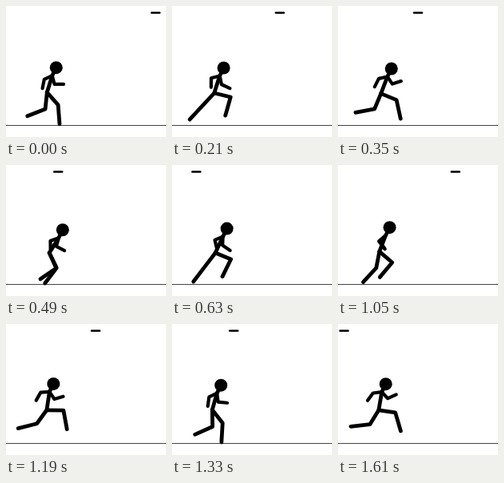
Animation, 200 px wide and 164 px high, one loop 1.68 s. Source, as an HTML page with a canvas:

```html
<!DOCTYPE html>
<html lang="en">
<head>
<meta charset="utf-8">
<title>Running stick figure</title>
<style>
  html, body { margin: 0; width: 100%; height: 100%; overflow: hidden; background: #fff; }
  canvas { display: block; width: 200px; height: 164px; }
</style>
</head>
<body>
<canvas id="stage" width="200" height="164"></canvas>
<script>
const ctx = document.getElementById('stage').getContext('2d');
const STEP_MS = 70, STEPS = 24, STRIDE = 12;

// Closed paths over one stride: foot seen from the hip, hand from the shoulder.
const footPath = [[15, 40], [-13, 39], [-29, 35], [-36, 20], [-24, 30], [-6, 33], [11, 29], [28, 24]];
const handPath = [[-12, 16], [-8, 15], [11, 17], [18, 3], [14, 11], [4, 17], [-9, 15], [-18, 10]];

const wave = (t, period) => Math.cos(2 * Math.PI * t / period);

// Closed Catmull-Rom spline through evenly timed points.
function along(path, phase) {
  const n = path.length;
  const s = ((phase / STRIDE % 1 + 1) % 1) * n;
  const i = Math.floor(s), k = s - i;
  const [a, b, c, d] = [-1, 0, 1, 2].map(o => path[(i + o + n) % n]);
  return [0, 1].map(j => b[j] + k / 2 * (c[j] - a[j]
    + k * (2 * a[j] - 5 * b[j] + 4 * c[j] - d[j] + k * (3 * (b[j] - c[j]) + d[j] - a[j]))));
}

function line(...points) {
  ctx.beginPath();
  points.forEach(p => ctx.lineTo(...p));
  ctx.stroke();
}

// Two-bone limb; side picks which way the joint bends.
function limb(root, end, upper, lower, side) {
  const dx = end[0] - root[0], dy = end[1] - root[1];
  const dist = Math.hypot(dx, dy) || 1;
  const reach = Math.min(upper, (upper * upper - lower * lower + dist * dist) / (2 * dist));
  const out = side * Math.sqrt(upper * upper - reach * reach);
  const joint = [
    root[0] + (dx * reach - dy * out) / dist,
    root[1] + (dy * reach + dx * out) / dist
  ];
  line(root, joint, end);
}

function drawDash(step) {
  const x = (step < STRIDE ? 181 : 193) - 17.4 * (step % STRIDE);
  ctx.lineWidth = 2.5;
  line([x + 1, 8.5], [x + 11, 8.5]);
}

function drawRunner(step) {
  const phase = step - 0.35 + 0.6 * wave(step - 4, STEPS);
  const lean = wave(step - 8, STEPS);
  const bob = wave(phase - 1.2, STRIDE / 2);
  const head = [64.5 + 4.5 * lean + 2 * bob, 77.8 + 2 * lean + 1.5 * bob];
  const shoulder = [head[0] - 5, head[1] + 10];
  const hip = [52.3 + 2 * lean, 108.7 + 1.3 * lean];

  ctx.lineWidth = 4.8;
  line(head, shoulder, hip);
  for (const side of [0, STRIDE / 2]) {
    const [footX, footY] = along(footPath, phase + side);
    const [handX, handY] = along(handPath, phase + side);
    ctx.lineWidth = 4.8;
    limb(hip, [hip[0] + footX, Math.min(148, hip[1] + footY)], 21, 24, -1);
    ctx.lineWidth = 4.2;
    limb(shoulder, [shoulder[0] + handX, shoulder[1] + handY], 11, 11.5, 1);
  }

  ctx.beginPath();
  ctx.arc(head[0], head[1], 8, 0, Math.PI * 2);
  ctx.fill();
}

function draw(step) {
  ctx.fillStyle = '#fff';
  ctx.fillRect(0, 0, 200, 164);
  ctx.fillStyle = '#444';
  ctx.fillRect(0, 149, 200, 1);

  ctx.fillStyle = ctx.strokeStyle = '#000';
  ctx.lineCap = ctx.lineJoin = 'round';
  drawDash(step);
  drawRunner(step);
}

const start = performance.now();
function tick() {
  draw(Math.floor((performance.now() - start) / STEP_MS) % STEPS);
  requestAnimationFrame(tick);
}
tick();
</script>
</body>
</html>
```
